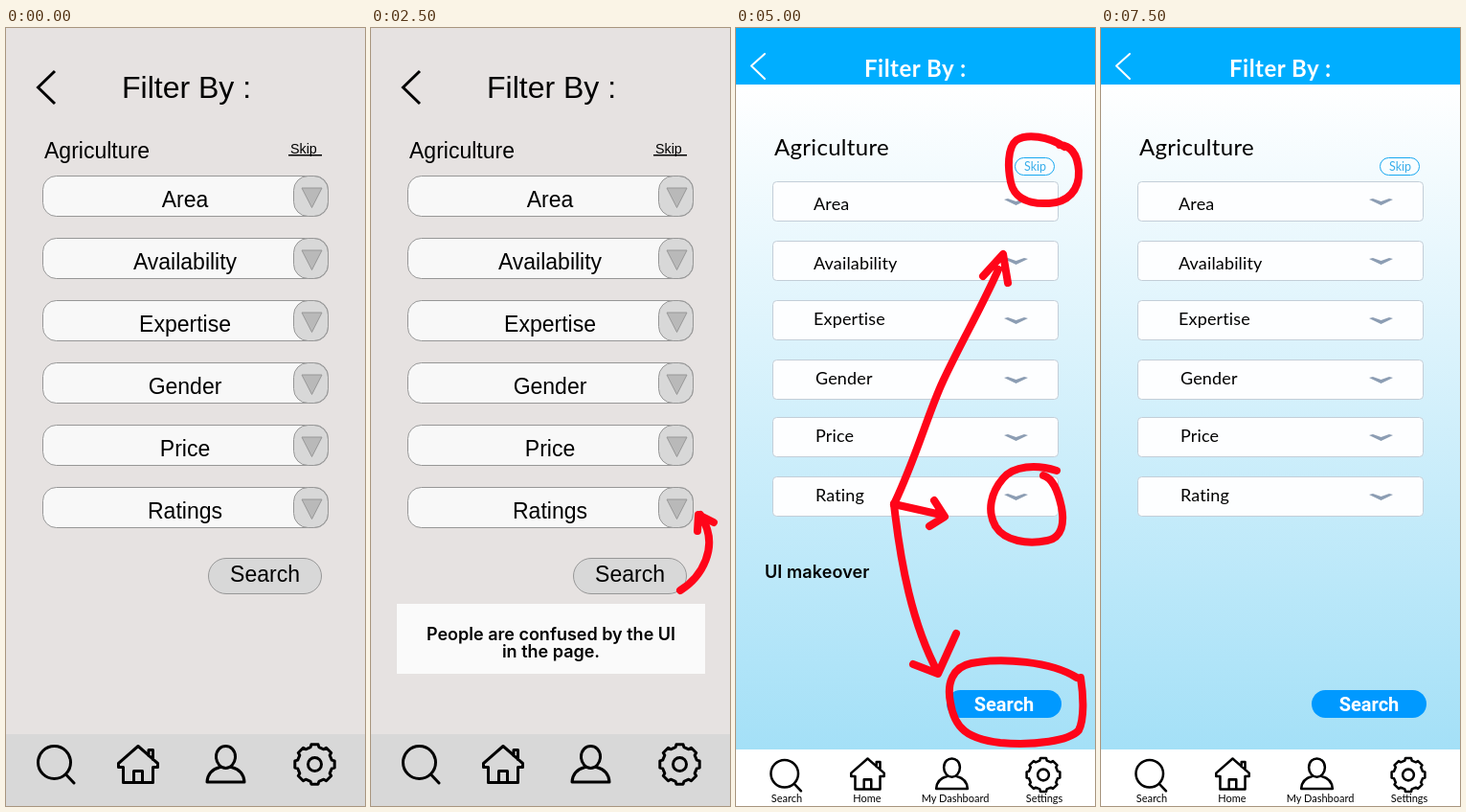
An HTML page for the animation above (10000 ms loop, 375 by 812 pixels).

```html
<!DOCTYPE html>
<html lang="en">
<head>
<meta charset="utf-8">
<title>Filter page makeover</title>
<style>
  html, body { margin: 0; width: 100%; height: 100%; overflow: hidden; }
  svg { display: block; width: 375px; height: 812px; }
  .plain { font-family: "Liberation Sans", Arial, sans-serif; }
  .round { font-family: Lato, sans-serif; }
  .note { font: 600 18px Inter, sans-serif; }
  .line, .pen { fill: none; stroke-linecap: round; stroke-linejoin: round; }
  .line { stroke: #000; stroke-width: 3; }
  .pen { stroke: #ff0519; stroke-width: 8; }
  .box { stroke: #979797; }
</style>
</head>
<body>
<svg viewBox="0 0 375 812">
  <defs>
    <linearGradient id="sky" x1="0" y1="0" x2="0" y2="1">
      <stop offset="0" stop-color="#fff"/>
      <stop offset="1" stop-color="#a4e0f7"/>
    </linearGradient>
  </defs>
  <g id="before"></g>
  <g id="complaint"></g>
  <g id="after"></g>
  <g id="marks"></g>
</svg>
<script>
const $ = id => document.getElementById(id);

const text = (s, x, y, size, attrs = "") =>
  `<text x="${x}" y="${y}" font-size="${size}" ${attrs}>${s}</text>`;
const rect = (x, y, w, h, r, fill, attrs = "") =>
  `<rect x="${x}" y="${y}" width="${w}" height="${h}" rx="${r}" fill="${fill}" ${attrs}/>`;
const path = (d, cls, attrs = "") => `<path d="${d}" class="${cls}" ${attrs}/>`;
const mid = 'text-anchor="middle"';

function gear() {
  const points = [];
  for (let k = 0; k < 8; k++) {
    for (const [turn, r] of [[-14, 18.3], [-10, 21], [10, 21], [14, 18.3]]) {
      const a = (k * 45 + turn) * Math.PI / 180;
      points.push((r * Math.cos(a)).toFixed(1) + " " + (r * Math.sin(a)).toFixed(1));
    }
  }
  return `M${points.join("L")}Z M7 0A7 7 0 1 1 -7 0A7 7 0 1 1 7 0`;
}

// Icons drawn around their own centres
const icons = [
  "M15.5 -2A17 17 0 1 1 -18.5 -2A17 17 0 1 1 15.5 -2M10.5 10.5L19 19.5",
  "M-20.5 3V-1L0 -19L20.5 -1V3H15.5V19H-15.5V3ZM-4.5 19V7H4.5V19M11 -9V-15H15.5V-5",
  "M10 -8C10 -1 5 4 0 4S-10 -1 -10 -8S-5 -19 0 -19S10 -15 10 -8M-6 3C-14 5 -19 10 -19.5 18.5H19.5C19 10 14 5 6 3",
  gear()
];
const nav = (spots, scale) => icons.map((d, i) =>
  path(d, "line", `transform="translate(${spots[i]}) scale(${scale})"`)).join("");

function oldField(name, i) {
  const y = 154.5 + 65 * i;
  return rect(38.5, y, 298, 42, 14, "#f8f8f8", 'class="box"') +
    rect(300.5, y, 36, 42, 15, "#d8d8d8", 'class="box"') +
    path(`M309 ${y + 12.5}H330L319.5 ${y + 33}Z`, "box", 'fill="#b9b9b9"') +
    text(name, 187, y + 32.5, 23, mid);
}

function newField([name, x, y, base]) {
  return rect(38.5, y + .5, 298, 41, 4, "#fdfeff", 'stroke="#c3ced8"') +
    text(name, x, base, 18, 'letter-spacing=".15"') +
    `<path d="M280 ${y + 19}L284 ${y + 18}L292.5 ${y + 21}L301 ${y + 18}L305 ${y + 19}L292.5 ${y + 25}Z" fill="#8c9db3"/>`;
}

$("before").innerHTML = `<g class="plain">` +
  rect(0, 0, 375, 812, 0, "#e6e2e1") +
  path("M51 45L33.5 62L51 79", "line", 'style="stroke-linecap:butt;stroke-linejoin:miter"') +
  text("Filter By :", 121, 73, 32) +
  text("Agriculture", 40, 136, 23) +
  text("Skip", 297, 131, 14.3) +
  rect(295, 132, 35, 1.5, 0, "#000") +
  ["Area", "Availability", "Expertise", "Gender", "Price", "Ratings"].map(oldField).join("") +
  rect(211.5, 553.5, 118, 37, 18.5, "#d8d8d8", 'class="box"') +
  text("Search", 270.5, 578, 23, mid) +
  rect(0, 737, 375, 75, 0, "#d8d8d8") +
  nav(["52 768.5", "138 768.5", "229.5 768.5", "322.5 768.5"], 1) + "</g>";

$("complaint").innerHTML =
  path("M323 587C344 574 366 542 344 508M341 525L342 508L358 516", "pen") +
  rect(27, 601, 322, 73, 0, "#fafafa") +
  `<g class="note" text-anchor="middle"><text x="188" y="639">People are confused by the UI</text>
   <text x="188" y="657">in the page.</text></g>`;

$("after").innerHTML = `<g class="round">` +
  rect(0, 59, 375, 694, 0, "url(#sky)") +
  rect(0, 0, 375, 59, 0, "#00aeff") +
  path("M30 27L16 39.5L30 53", "line", 'style="stroke:#fff;stroke-width:2"') +
  text("Filter By :", 134, 51, 24, 'font-weight="700" fill="#fff" letter-spacing=".5"') +
  text("Agriculture", 40, 133, 24, 'letter-spacing=".3"') +
  rect(291.5, 135.5, 41, 18, 9, "#f8fdff", 'stroke="#18a8f0"') +
  text("Skip", 312.5, 149, 12.5, mid + ' fill="#3aaeea"') +
  [["Area", 81, 160, 190], ["Availability", 81, 222, 252], ["Expertise", 81, 284, 310],
   ["Gender", 83, 346, 372], ["Price", 83, 406, 432], ["Rating", 83, 468, 494]].map(newField).join("") +
  rect(220, 691, 120, 29, 14.5, "#0099ff") +
  text("Search", 280, 713, 20, mid + ' fill="#fff" style="font-family:Roboto,sans-serif;font-weight:600"') +
  rect(0, 753, 375, 59, 0, "#fff") +
  nav(["52 780", "137.5 778.5", "225.5 778.5", "321 779.5"], .84) +
  [["Search", 53], ["Home", 137], ["My Dashboard", 229], ["Settings", 322]]
    .map(([s, x]) => text(s, x, 808, 11, mid)).join("") + "</g>";

$("marks").innerHTML = [
  "M343 124C326 113 304 110 293 117C283 125 284 147 287 161C291 179 307 184 327 183C346 182 359 170 358 149C357 135 352 123 338 122",
  "M335 462C313 455 290 457 279 470C266 485 262 504 271 520C281 536 305 539 325 535C341 532 343 516 340 500C336 482 331 470 321 467",
  "M356 678C329 661 278 657 246 663C226 667 220 684 224 704C228 731 242 742 276 746C312 749 348 744 358 733C364 721 363 697 360 678",
  "M165 497C188 449 201 401 216 369C234 330 258 289 274 252M258 259L279 236L284 266",
  "M165 497L214 508M207 493L218 510L202 520",
  "M165 497C172 560 184 622 211 673M185 664L211 674L230 632"
].map(d => path(d, "pen")).join("") +
  text("UI makeover", 30, 574, 18, 'class="note" letter-spacing=".1"');

// Groups visible during each quarter of the loop
const scenes = [["before"], ["before", "complaint"], ["after", "marks"], ["after"]];
const groups = ["before", "complaint", "after", "marks"];

function draw(now) {
  const shown = scenes[Math.floor(now % 10000 / 2500)];
  for (const id of groups) $(id).style.display = shown.includes(id) ? "" : "none";
}
const start = performance.now();
function tick() {
  draw(performance.now() - start);
  requestAnimationFrame(tick);
}
tick();
</script>
</body>
</html>
```
